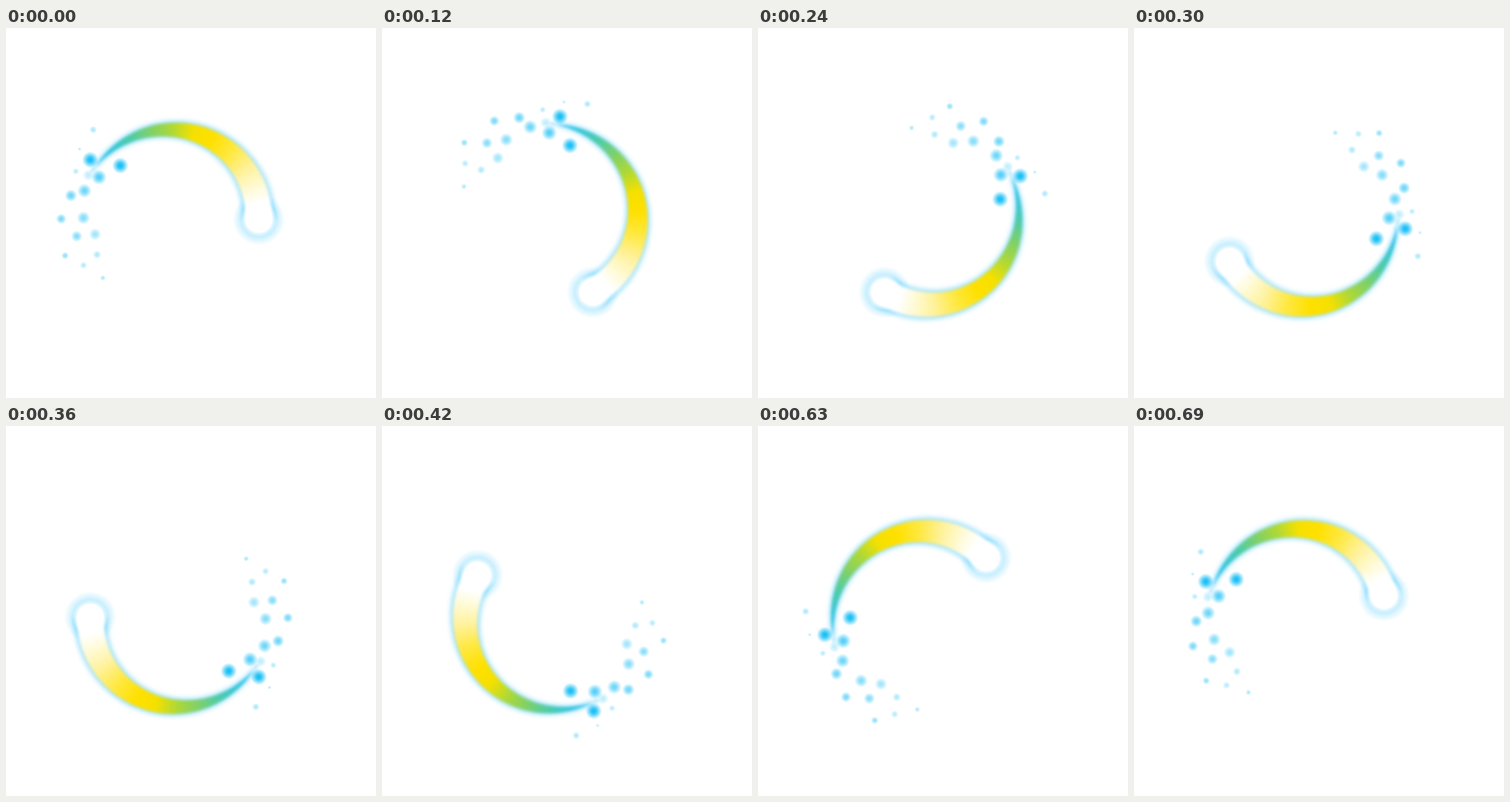
Write an HTML page with a canvas that moves like this. It is 382 px wide and 382 px high and loops after 0.72 s.

```html
<!DOCTYPE html>
<html lang="en">
<head>
<meta charset="utf-8">
<title>Comet spinner</title>
<style>
  html, body { margin: 0; width: 100%; height: 100%; overflow: hidden; background: #fff; }
  canvas { display: block; transform-origin: 174px 197.5px; }
</style>
</head>
<body>
<canvas id="comet" width="382" height="382"></canvas>
<script>
const canvas = document.getElementById('comet');
const ctx = canvas.getContext('2d');
const CX = 174, CY = 197.5, RADIUS = 87, TAIL = 150;
const STEP_MS = 30, STEPS = 24;
const rad = deg => deg * Math.PI / 180;

// Colours by degrees behind the head
const tailColors = [
  [0, '#fff'], [11, '#fff'], [20, '#fffbdc'], [34, '#fff2a0'], [50, '#ffe840'],
  [65, '#ffe000'], [78, '#f5e000'], [92, '#acd838'], [105, '#80d068'],
  [118, '#50cca4'], [135, '#30c4e0'], [150, '#1cc0fa']
];

// Crescent that narrows and drifts outwards towards its tip
function tailPath(extra) {
  const path = new Path2D();
  const edge = (back, side) => {
    const k = back / TAIL;
    const half = 15 * (1 - k ** 1.5) + extra * (1 - 0.5 * k);
    const r = RADIUS + 11.5 * k ** 1.5 + side * half;
    path.lineTo(CX + r * Math.cos(rad(-back)), CY + r * Math.sin(rad(-back)));
  };
  for (let b = 0; b <= TAIL; b += 2) edge(b, 1);
  for (let b = TAIL; b >= 0; b -= 2) edge(b, -1);
  path.closePath();
  return path;
}

function glow(x, y, r, stops) {
  const g = ctx.createRadialGradient(x, y, 0, x, y, r);
  stops.forEach(([at, color]) => g.addColorStop(at, color));
  ctx.fillStyle = g;
  ctx.beginPath();
  ctx.arc(x, y, r, 0, 2 * Math.PI);
  ctx.fill();
}

function drawComet() {
  const hx = CX + RADIUS;
  glow(hx, CY, 27, [[0, 'rgba(0,180,250,.4)'], [0.55, 'rgba(0,180,250,.36)'],
    [0.75, 'rgba(0,180,250,.16)'], [1, 'rgba(0,180,250,0)']]);

  ctx.filter = 'blur(2.5px)';
  ctx.fillStyle = 'rgba(0,180,250,.38)';
  ctx.fill(tailPath(2));

  const sweep = ctx.createConicGradient(Math.PI, CX, CY);
  tailColors.forEach(([back, color]) => sweep.addColorStop((180 - back) / 360, color));
  ctx.filter = 'blur(1.5px)';
  ctx.fillStyle = sweep;
  ctx.fill(tailPath(-1));
  ctx.filter = 'none';

  glow(hx, CY, 19, [[0, '#fff'], [0.7, '#fff'], [1, 'rgba(255,255,255,0)']]);
}

// x, y, radius, strength
const sparks = [
  [87, 136, 8.5, 0.95], [118, 142, 8.5, 0.95], [96, 154, 8, 0.7], [81, 168, 7.5, 0.6],
  [67, 173, 6.5, 0.6], [57, 197, 5.5, 0.55], [80, 196, 7, 0.5], [73, 215, 6, 0.5],
  [92, 213, 6.5, 0.38], [61, 235, 4, 0.45], [80, 245, 4, 0.3], [94, 234, 4.5, 0.33],
  [100, 258, 3, 0.35], [90, 105, 4, 0.35], [72, 148, 3.5, 0.3], [76, 125, 2, 0.3],
  [85, 152, 6, 0.25]
];

drawComet();
for (const [x, y, r, a] of sparks)
  glow(x, y, r, [[0, `rgba(0,184,245,${a})`], [0.35, `rgba(0,184,245,${a * 0.8})`],
    [1, 'rgba(0,184,245,0)']]);

function frame() {
  const step = Math.floor(performance.now() / STEP_MS) % STEPS;
  canvas.style.transform = `rotate(${step * 360 / STEPS}deg)`;
  requestAnimationFrame(frame);
}
frame();
</script>
</body>
</html>
```
